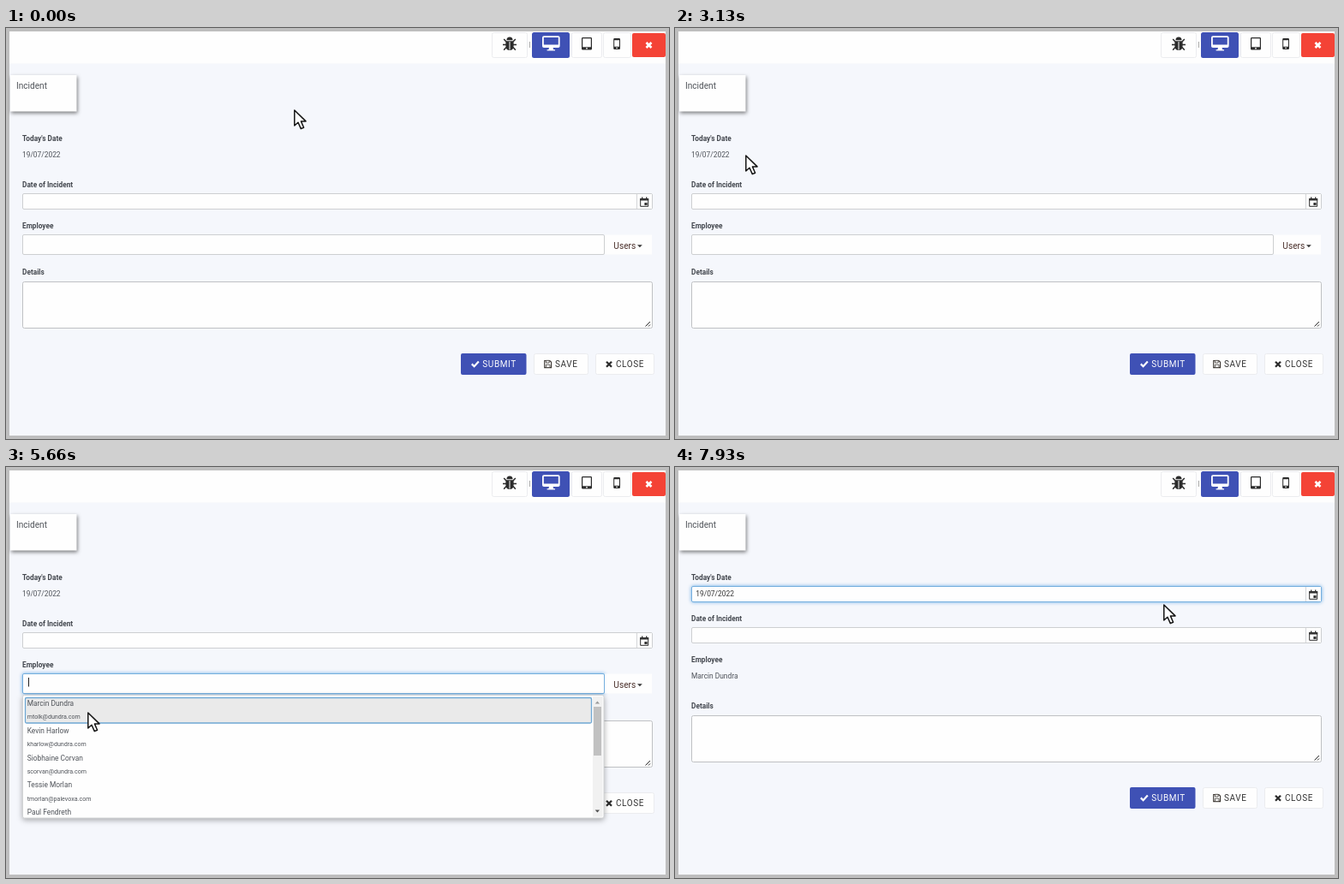
An HTML page for the animation above (8 s loop, 774 by 480 pixels).

```html
<!DOCTYPE html>
<html lang="en">
<head>
<meta charset="utf-8">
<title>Incident form</title>
<style>
  html, body { margin: 0; width: 100%; height: 100%; overflow: hidden; background: #bebebe; }
  svg { display: block; width: 774px; height: 480px; }
  text { font: 8.4px Roboto, Arial, sans-serif; fill: #50545a; white-space: pre; }
  .label { font-size: 8.3px; font-weight: 700; fill: #43474e; }
  .title { font-size: 10.1px; }
  .cap { font-size: 10px; letter-spacing: .6px; fill: #333; }
  .mail { font-size: 7.1px; }
  .field { fill: #fefefe; stroke: #cdcfd1; }
  .btn { fill: #fefefe; stroke: #ebecef; }
  .blue { fill: #3f51b5; }
  .dark { fill: #2b2b2b; }
  .line { fill: none; stroke: #2b2b2b; }
  .hover .field { stroke: #a9abad; }
  .hover .pick { fill: #e4e5e7; }
  .focus .field { stroke: #74aede; filter: drop-shadow(0 0 2px rgba(82, 160, 225, .85)); }
  .pick { fill: #fefefe; }
  .drop { filter: drop-shadow(0 2px 3px rgba(0, 0, 0, .32)); }
</style>
</head>
<body>
<svg viewBox="0 0 774 480">
  <defs>
    <g id="dateBox">
      <rect class="field" x="19.5" y=".5" width="735" height="18" rx="1.5"/>
      <rect class="pick" x="737" y="1" width="17" height="17"/>
      <path d="M736.5 1V18" stroke="#d3d5d7"/>
      <path class="line" stroke="#333" d="M740.7 6.5H749.7V15.3H740.7Z"/>
      <path d="M740.2 6H750.2V8.4H740.2ZM742 4.4H743.4V6H742ZM747 4.4H748.4V6H747ZM745.4 11H748.6V14H745.4Z" fill="#333"/>
    </g>
    <path id="cross" d="M-3 -3L3 3M3 -3L-3 3" fill="none"/>
    <path id="arrow" d="M.8 1V19L5 15.2 8.3 22.6 11.6 21.2 8.4 13.9H14Z" fill="#fff" stroke="#151515" stroke-width="1.5" stroke-linejoin="round"/>
    <path id="beam" d="M-4.6 -11.2H4.6V-8.8H1.3V8.8H4.6V11.2H-4.6V8.8H-1.3V-8.8H-4.6Z" fill="#d9d9d9" stroke="#222" stroke-width="1.3"/>
    <clipPath id="listClip"><rect x="20" y="267" width="677" height="142"/></clipPath>
  </defs>

  <rect width="774" height="480" fill="#bebebe"/>
  <rect x="4" y="4" width="766" height="472" fill="#f5f7fc"/>
  <rect x="4" y="4" width="766" height="37.5" fill="#fefefe"/>

  <!-- toolbar -->
  <rect class="btn" x="567.5" y="5.5" width="41" height="29" rx="2"/>
  <rect x="611" y="16" width="1" height="7" fill="#aaa"/>
  <rect class="blue" x="614" y="5" width="44" height="30" rx="2.5"/>
  <rect class="btn" x="660.5" y="5.5" width="35" height="29" rx="2"/>
  <rect class="btn" x="697.5" y="5.5" width="32" height="29" rx="2"/>
  <rect x="731" y="6" width="39" height="28" rx="2" fill="#f44336"/>
  <g transform="translate(588 18.5)">
    <path class="dark" d="M-3.6 -4.2A3.6 3.8 0 0 1 3.6 -4.2ZM-4.6 -3.2H4.6V2.6Q4.6 7.6 0 7.6Q-4.6 7.6 -4.6 2.6Z"/>
    <path class="line" stroke-width="1.5" d="M-4 -2.4L-6.8 -5.4M4 -2.4L6.8 -5.4M-4 1H-8M4 1H8M-4 4L-6.8 7.2M4 4L6.8 7.2"/>
    <path d="M0 -2.4V7" stroke="#fefefe"/>
  </g>
  <g fill="#fff">
    <path d="M628 9.2H644.6Q646.6 9.2 646.6 11.2V21.2Q646.6 23 644.6 23H628Q626 23 626 21.2V11.2Q626 9.2 628 9.2ZM627.8 11V19.6H644.8V11Z" fill-rule="evenodd"/>
    <path d="M634 23H638.6L639.2 25.2H641V26.6H631.6V25.2H633.4Z"/>
  </g>
  <path class="dark" fill-rule="evenodd" d="M673.2 11H682.8Q684 11 684 12.2V24.2Q684 25.4 682.8 25.4H673.2Q672 25.4 672 24.2V12.2Q672 11 673.2 11ZM673.2 12.2V22.2H682.8V12.2ZM677.2 23.1V24.4H678.8V23.1Z"/>
  <path class="dark" fill-rule="evenodd" d="M710.4 12H715.8Q717 12 717 13.2V23.8Q717 25 715.8 25H710.4Q709.2 25 709.2 23.8V13.2Q709.2 12 710.4 12ZM710.2 14.2V21.8H716V14.2ZM712.3 22.8V24.1H713.9V22.8Z"/>
  <use href="#cross" x="750.5" y="20" stroke="#fff" stroke-width="2.7"/>

  <rect x="5" y="55" width="77.5" height="42.5" fill="#fefefe" style="filter:drop-shadow(1.5px 2px 2px rgba(0,0,0,.5))"/>
  <text class="title" x="12" y="71.4">Incident</text>

  <text class="label" x="19" y="132">Today's Date</text>
  <text id="dateText" x="19" y="151.4">19/07/2022</text>
  <g id="today">
    <use href="#dateBox" class="slot"/>
    <text x="24.3" y="151.2" style="fill:#333">19/07/2022</text>
  </g>

  <g id="lower">
    <text class="label" x="19" y="186">Date of Incident</text>
    <g id="incident"></g>
    <text class="label" x="19" y="234.4">Employee</text>
    <g id="employee">
      <rect class="field" x="19.5" y="241.5" width="679" height="23" rx="1.5"/>
      <rect x="699" y="241.5" width="55" height="23" fill="#fefefe"/>
      <text x="709.3" y="257.6" style="font-size:10.2px;fill:#4a2f2a">Users</text>
      <path d="M737 253.2H742.8L739.9 256.2Z" fill="#333"/>
    </g>
    <text id="chosen" x="19" y="253.3">Marcin Dundra</text>
    <text class="label" x="19" y="288.2">Details</text>
    <rect class="field" x="19.5" y="296.5" width="735" height="54" rx="2" style="stroke:#bfc1c3"/>
    <path d="M746.5 348.5L752 343M750 348.5L752 346.5" class="line" stroke="#555"/>
    <rect class="blue" x="531" y="380" width="76.5" height="25" rx="2"/>
    <path d="M543.8 392.4L546.6 395.2L551.8 389.6" fill="none" stroke="#fff" stroke-width="2.2"/>
    <text class="cap" x="556.3" y="396.1" style="fill:#fff">SUBMIT</text>
    <rect class="btn" x="616.5" y="380.5" width="63" height="24" rx="2"/>
    <path d="M628.7 388.5H634.8L636.6 390.3V396.6H628.7Z" fill="#fff" stroke="#3a3530" stroke-width="1.1"/>
    <path d="M630.4 388.3H634.2V391H630.4ZM630.4 393.2H635V396.4H630.4Z" fill="#fff" stroke="#3a3530" stroke-width=".8"/>
    <text class="cap" x="641" y="396.1">SAVE</text>
    <rect class="btn" x="688.5" y="380.5" width="68" height="24" rx="2"/>
    <use href="#cross" x="704" y="392.8" stroke="#2b2b2b" stroke-width="2.3"/>
    <text class="cap" x="712" y="396.1">CLOSE</text>
  </g>

  <path id="caret" d="M26.5 246V256.5" stroke="#222"/>
  <g id="empty">
    <rect class="drop" x="19.5" y="266.5" width="678.5" height="100.5" rx="2" fill="#fefefe" stroke="#d0d2d4"/>
    <text x="331" y="319.3" style="font-size:7px;fill:#9b9b9b">NO DATA FOUND</text>
  </g>
  <g id="list">
    <rect class="drop" x="19.5" y="266.5" width="678.5" height="143.5" rx="2" fill="#fefefe" stroke="#d0d2d4"/>
    <rect x="22.5" y="269.5" width="661" height="29.5" rx="1.5" fill="#eaeaea" stroke="#6fa8d4" stroke-width="1.3"/>
    <rect x="685" y="268" width="11.5" height="140.5" fill="#f1f1f1"/>
    <rect x="686" y="280" width="9" height="57" fill="#c1c1c1"/>
    <path d="M687.7 276.4H693.1L690.4 273.4Z" fill="#9a9a9a"/>
    <path d="M687.7 400.4H693.1L690.4 403.4Z" fill="#505050"/>
    <g id="people" clip-path="url(#listClip)"></g>
  </g>

  <g id="cursor"><use id="arrowUse" href="#arrow"/><use id="beamUse" href="#beam"/></g>
</svg>
<script>
const $ = id => document.getElementById(id);
const NS = 'http://www.w3.org/2000/svg';
const LOOP = 8000, TICK = 1000 / 15;
const CLICK = 4330, EMPTY = 4470, LOADED = 5000, CHOSEN = 5790, EDIT = 7000;

// time, x, y of the pointer
const path = [
  [600, 336, 95], [1020, 273, 142], [1467, 197, 168], [1800, 134, 172], [2267, 38, 153],
  [2333, 38, 152], [2400, 38, 152], [2600, 18.5, 149], [3133, 82, 148],
  [3400, 82, 148], [4000, 97.5, 213], [4200, 97, 252], [5133, 97, 252],
  [5600, 95, 286], [6267, 95, 286], [6733, 73, 156], [6930, 68, 145],
  [7133, 72, 145], [7933, 570, 160]
];

const people = [
  ['Marcin Dundra', 'mtolk@dundra.com'],
  ['Kevin Harlow', 'kharlow@dundra.com'],
  ['Siobhaine Corvan', 'scorvan@dundra.com'],
  ['Tessie Morlan', 'tmorlan@palevoxa.com'],
  ['Paul Fendreth', '']
];

function addText(parent, x, y, str, cls) {
  const el = document.createElementNS(NS, 'text');
  el.setAttribute('x', x);
  el.setAttribute('y', y);
  if (cls) el.setAttribute('class', cls);
  el.textContent = str;
  parent.append(el);
}
people.forEach(([name, mail], i) => {
  const y = 279.2 + i * 31.7;
  addText($('people'), 24.7, y, name);
  addText($('people'), 24.7, y + 15.2, mail, 'mail');
});

// Both date fields are copies of one drawing, so that hover and focus style each alone.
function placeDateBox(host, y) {
  const box = $('dateBox').cloneNode(true);
  box.removeAttribute('id');
  box.setAttribute('transform', `translate(0 ${y})`);
  host.prepend(box);
}
document.querySelector('.slot').remove();
placeDateBox($('today'), 139);
placeDateBox($('incident'), 193);

function pointAt(t) {
  if (t <= path[0][0]) return path[0].slice(1);
  const i = path.findIndex(p => p[0] > t);
  if (i < 0) return path[path.length - 1].slice(1);
  const [t0, x0, y0] = path[i - 1], [t1, x1, y1] = path[i];
  const k = (t - t0) / (t1 - t0);
  return [x0 + (x1 - x0) * k, y0 + (y1 - y0) * k];
}

const show = (id, on) => { $(id).style.display = on ? '' : 'none'; };
const mark = (id, cls, on) => $(id).classList.toggle(cls, on);

function draw(now) {
  const t = Math.floor((now + 7) / TICK) * TICK;
  const [x, y] = pointAt(t);
  const chosen = t >= CHOSEN, open = t >= CLICK && !chosen;
  const over = (x0, x1, y0, y1) => x >= x0 && x <= x1 && y >= y0 && y <= y1;
  const shift = chosen ? -6 : 0;

  const onToday = chosen && over(19, 736, 139, 155);
  const onIncident = over(19, 736, 193 + shift, 213.5 + shift);
  const onText = chosen ? over(19, 71, 239, 250) : over(18, 64, 143, 152.5);
  const onEmployee = !chosen && over(19, 698, 241, 265);
  const beam = !open && (onToday || onIncident || onText || onEmployee);

  $('lower').setAttribute('transform', `translate(0 ${shift})`);
  show('dateText', !chosen);
  show('today', chosen);
  show('employee', !chosen);
  show('chosen', chosen);
  show('caret', open);
  show('empty', t >= EMPTY && t < LOADED);
  show('list', t >= LOADED && !chosen);
  mark('today', 'hover', onToday);
  mark('today', 'focus', t >= EDIT);
  mark('incident', 'hover', onIncident);
  mark('employee', 'focus', open);

  $('cursor').setAttribute('transform', `translate(${Math.round(x)} ${Math.round(y)})`);
  show('arrowUse', !beam);
  show('beamUse', beam);
}

function frame() {
  draw(performance.now() % LOOP);
  requestAnimationFrame(frame);
}
frame();
</script>
</body>
</html>
```
